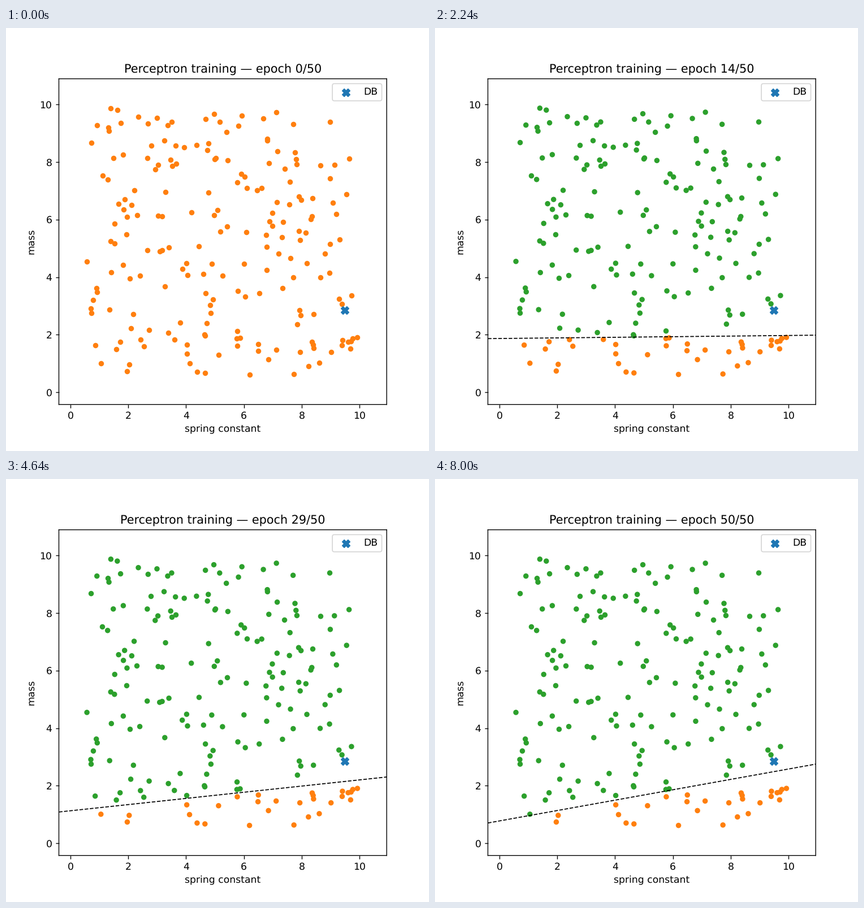
Recreate the animation shown at these times as a matplotlib script. Size 748x748 px, loop 8160 ms.

```python
import matplotlib.pyplot as plt
import numpy as np
from matplotlib.animation import FuncAnimation

plt.rcParams.update({"path.snap": False, "text.hinting": "none"})

EPOCHS = 50
N_SAMPLES = 198
XLIM = (-0.40, 10.94)
YLIM = (-0.427, 10.895)

rng = np.random.default_rng(42)
spring, mass = rng.uniform(0.5, 10, (2, N_SAMPLES))


def boundary(epoch):
    """Height of the decision line at the left and right edge of the axes."""
    swing = np.exp(-(epoch - 1) / 1.2)  # fast settling of the first epochs
    left = 0.55 + 1.77 * np.exp(-(epoch - 9) / 16.7) - 3.2 * swing
    right = 1.875 + 0.0213 * (epoch - 9) - 12 * swing
    return left, right


fig, ax = plt.subplots(figsize=(6, 6), dpi=748 / 6)
dots = ax.scatter(spring, mass, s=20, c="C1")
line, = ax.plot([], [], "k--", lw=1)
ax.scatter(9.49, 2.85, s=60, c="C0", marker="X", label="DB", zorder=3)
ax.set(xlim=XLIM, ylim=YLIM, xlabel="spring constant", ylabel="mass")
ax.legend(loc="upper right")


def update(epoch):
    ax.set_title(f"Perceptron training — epoch {epoch}/{EPOCHS}")
    if epoch == 0:
        line.set_data([], [])
        dots.set_color("C1")
    else:
        ends = boundary(epoch)
        line.set_data(XLIM, ends)
        above = mass > np.interp(spring, XLIM, ends)
        dots.set_color(np.where(above, "C2", "C1"))
    return dots, line


anim = FuncAnimation(fig, update, frames=EPOCHS + 1, interval=160,
                     repeat=True, repeat_delay=0, blit=False)
plt.show()
```
